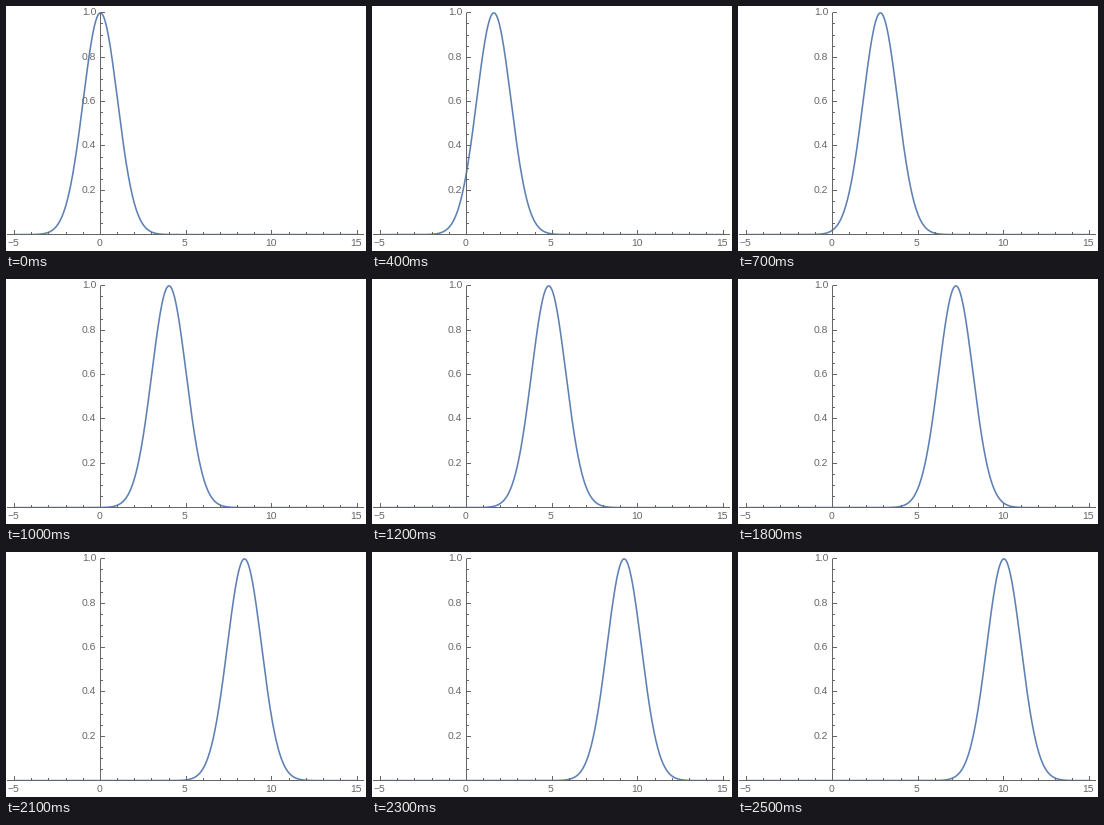
Recreate the animation shown at these times as a matplotlib script. Size 360x245 px, loop 2.6 s.

```python
import math

import numpy as np
import matplotlib.pyplot as plt
from matplotlib.animation import FuncAnimation
from matplotlib.patches import Rectangle

WIDTH, HEIGHT, DPI = 360, 245, 100
PX = 72 / DPI
FRAMES, INTERVAL = 26, 100
SHIFT_PER_FRAME = 0.4
GRAY, BLUE = "#666666", "#5e81b5"

plt.rcParams["text.hinting"] = "native"


def to_x(value):
    return 94.4 + 17.15 * value


def to_y(value):
    return 228.6 - 221.7 * value


def pixel_center(coord):
    return math.floor(coord) + 0.5


fig = plt.figure(figsize=(WIDTH / DPI, HEIGHT / DPI), dpi=DPI, facecolor="white")
ax = fig.add_axes([0, 0, 1, 1])
ax.set_xlim(0, WIDTH)
ax.set_ylim(HEIGHT, 0)
ax.axis("off")


def segment(x1, y1, x2, y2):
    ax.plot([x1, x2], [y1, y2], color=GRAY, lw=PX, zorder=3,
            solid_capstyle="butt", snap=False)


def label(x, y, text, align):
    ax.text(x, y, text, color=GRAY, family="Liberation Sans",
            fontsize=10.4 * PX, ha=align, va="center_baseline", zorder=4)


axis_x, axis_y = pixel_center(to_x(0)), pixel_center(to_y(0))
segment(1, axis_y, 358, axis_y)
segment(axis_x, 7, axis_x, 229)

for value in range(-5, 16):
    major = value % 5 == 0
    x = pixel_center(to_x(value))
    segment(x, axis_y, x, axis_y - (4.5 if major else 2.5))
    if major:
        label(to_x(value) - 1.3, 236.4, str(value).replace("-", "\u2212"), "center")

for step in range(1, 21):
    major = step % 4 == 0
    y = pixel_center(to_y(step / 20))
    segment(axis_x, y, axis_x + (4.5 if major else 2.5), y)
    if major:
        label(90.3, to_y(step / 20) - 1, f"{step / 20:.1f}", "right")

xs = np.linspace(-5, 15, 801)
curve, = ax.plot([], [], color=BLUE, lw=1.6 * PX, zorder=2)
curve.set_clip_path(Rectangle((0, 6), WIDTH, 223, transform=ax.transData))


def update(frame):
    center = SHIFT_PER_FRAME * frame
    curve.set_data(to_x(xs), to_y(np.exp(-(xs - center) ** 2 / 2)))
    return curve,


anim = FuncAnimation(fig, update, frames=FRAMES, interval=INTERVAL,
                     repeat=True, repeat_delay=0)
plt.show()
```
